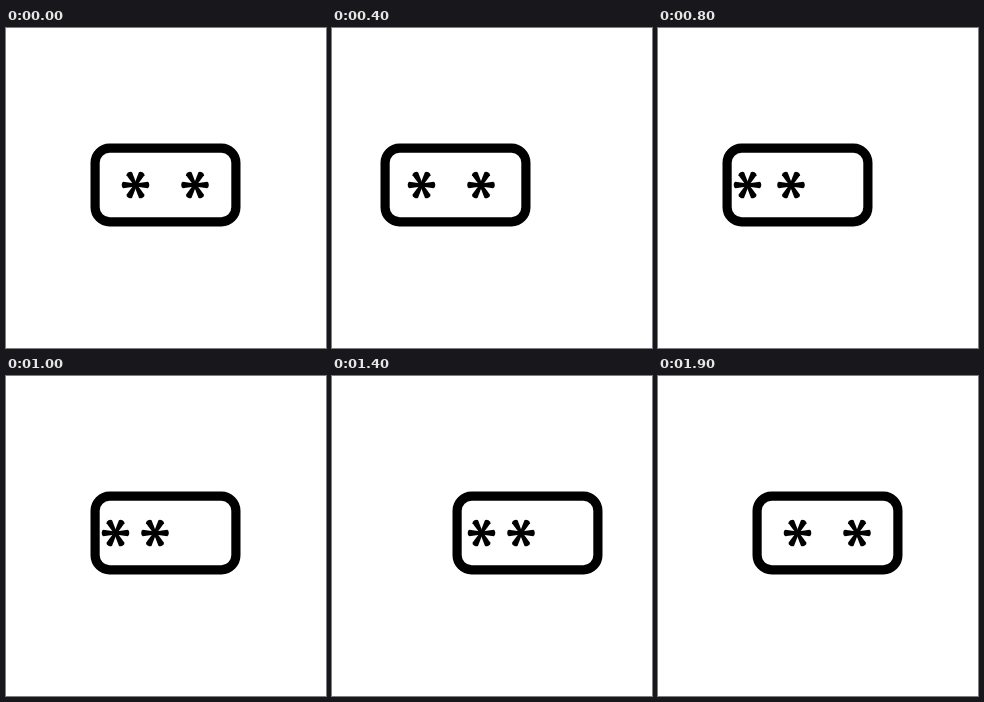
Write an HTML page that moves like this. It is 320x320 px and loops after 2 s.

```html
<!DOCTYPE html>
<html lang="en">
<head>
<meta charset="utf-8">
<title>Sliding box face</title>
<style>
  html, body { margin: 0; width: 100%; height: 100%; overflow: hidden; background: #fff; }
  svg { display: block; width: 100vw; height: 100vh; filter: blur(.45px); }
</style>
</head>
<body>
<svg viewBox="0 0 320 320">
  <defs>
    <path id="arm" d="M0-1.4 L12.2-3.2 Q13.8-2.6 13.8 0 Q13.8 2.6 12.2 3.2 L0 1.4Z"/>
    <g id="star">
      <use href="#arm"/>
      <use href="#arm" transform="rotate(61) scale(1.05 1)"/>
      <use href="#arm" transform="rotate(119) scale(1.05 1)"/>
      <use href="#arm" transform="rotate(180)"/>
      <use href="#arm" transform="rotate(241) scale(1.05 1)"/>
      <use href="#arm" transform="rotate(299) scale(1.05 1)"/>
    </g>
  </defs>
  <g id="box">
    <rect x="89.1" y="120.2" width="140.8" height="73.6" rx="14.5" fill="none" stroke="#000" stroke-width="9.2"/>
  </g>
  <g id="leftEye"><use href="#star" x="119.5" y="157"/></g>
  <g id="rightEye"><use href="#star" x="169" y="157"/></g>
</svg>
<script>
  const LOOP = 2000;
  const half = [0, 10, 20, 30, 36, 40, 36, 30, 20, 10];
  const sway = [...half.map(v => -v), ...half];

  // Every part follows the same sway; the eyes trail the box by whole steps.
  function slide(id, lag) {
    const n = sway.length;
    const frames = Array.from({ length: n + 1 }, (_, i) => ({
      offset: i / n,
      transform: `translateX(${sway[(i - lag + n) % n]}px)`,
      easing: 'steps(1, end)'
    }));
    return document.getElementById(id).animate(frames, { duration: LOOP, iterations: Infinity });
  }

  slide('box', 0);
  slide('leftEye', 1);
  slide('rightEye', 2);
</script>
</body>
</html>
```
